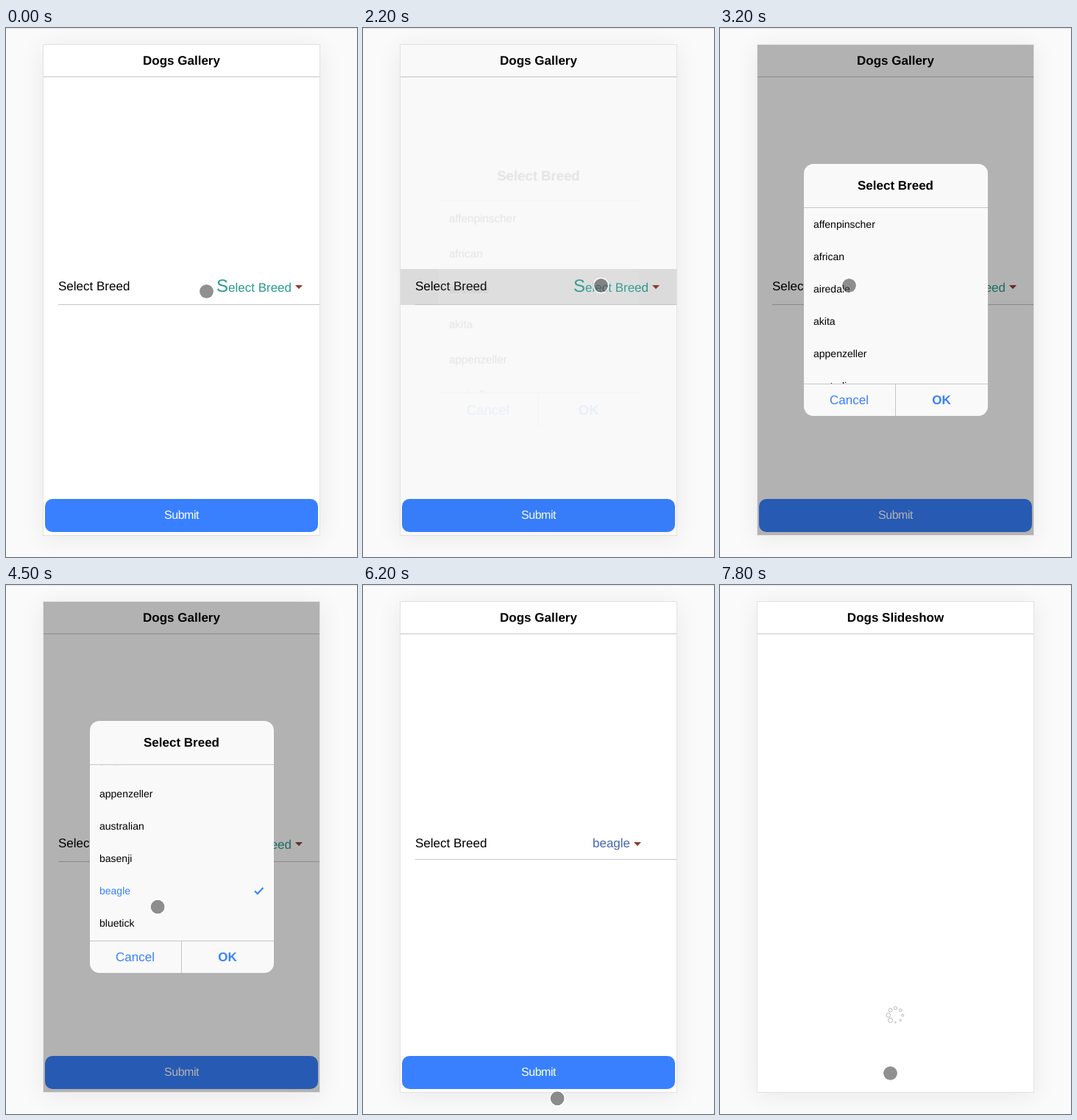
Write an HTML page with a canvas that moves like this. It is 477 px wide and 720 px high and loops after 8 s.

```html
<!DOCTYPE html>
<html lang="en">
<head>
<meta charset="utf-8">
<title>Dogs Gallery</title>
<style>
html, body { margin: 0; width: 477px; height: 720px; overflow: hidden; background: #fafafa; }
canvas { display: block; }
</style>
</head>
<body>
<canvas id="stage" width="477" height="720"></canvas>
<script>
const W = 477, H = 720, LOOP = 8000, STEP = 100;
const BLUE = '#3880ff', TEAL = '#2a9a8c', LINE = '#c6c6c8';
const BREEDS = ['affenpinscher', 'african', 'airedale', 'akita', 'appenzeller',
  'australian', 'basenji', 'beagle', 'bluetick'];

const stage = document.getElementById('stage').getContext('2d');
const layer = document.createElement('canvas');
layer.width = W;
layer.height = H;
const sheet = layer.getContext('2d');

// The pointer rests between glides; each one bends towards its "via" point.
const HOME = [272, 358];
const GLIDES = [
  { start: 400, length: 500, via: [238, 260], to: [267, 204] },
  { start: 1200, length: 400, via: [346, 392], to: [323, 350] },
  { start: 2600, length: 600, via: [249, 358], to: [175, 350] },
  { start: 3200, length: 300, via: [180, 300], to: [182, 258] },
  { start: 3500, length: 700, via: [186, 336], to: [181, 414] },
  { start: 4400, length: 420, via: [273, 502], to: [283, 513] },
  { start: 5813, length: 787, via: [269, 812], to: [231, 664] }
];

function progress(t, start, length) {
  return Math.min(1, Math.max(0, (t - start) / length));
}

function ease(t, start, length) {
  const p = progress(t, start, length);
  return p * p * (3 - 2 * p);
}

function pointerAt(t) {
  return GLIDES.reduce((from, { start, length, via, to }) => {
    const p = ease(t, start, length), q = 1 - p;
    return from.map((v, n) => q * q * v + 2 * p * q * via[n] + p * p * to[n]);
  }, HOME);
}

function scrollAt(t) {
  return 159 * (1 - (1 - progress(t, 3200, 1000)) ** 8);
}

function rect(c, x, y, w, h, color) {
  c.fillStyle = color;
  c.fillRect(x, y, w, h);
}

function rounded(c, x, y, w, h, r, color) {
  c.beginPath();
  c.roundRect(x, y, w, h, r);
  c.fillStyle = color;
  c.fill();
}

function text(c, str, x, y, { size = 17, weight = 'normal', color = '#000', align = 'left', spacing = '0px' } = {}) {
  c.font = `${weight} ${size}px "Liberation Sans", Arial, sans-serif`;
  c.textRendering = 'geometricPrecision';
  c.letterSpacing = spacing;
  c.textAlign = align;
  c.fillStyle = color;
  c.fillText(str, x, y);
}

function drawFrame(title) {
  const c = stage;
  rect(c, 0, 0, W, H, '#fafafa');
  rect(c, 0, 0, W, 1, '#e4e4e4');
  c.save();
  c.shadowColor = 'rgba(0,0,0,0.07)';
  c.shadowBlur = 32;
  c.shadowOffsetY = 4;
  rect(c, 50, 22, 377, 669, '#e2e2e2');
  c.restore();
  rect(c, 51, 23, 375, 667, '#fff');
  text(c, title, 238.5, 50, { weight: 'bold', align: 'center' });
  rect(c, 51, 66, 375, 1, LINE);
}

function drawArrow(x) {
  const c = stage;
  c.beginPath();
  c.moveTo(x, 350);
  c.lineTo(x + 10, 350);
  c.lineTo(x + 5, 355.3);
  c.fillStyle = '#8e3d30';
  c.fill();
}

function drawGallery(t) {
  const c = stage, chosen = t >= 5300;
  drawFrame('Dogs Gallery');
  if (t >= 2000 && t < 2500) rect(c, 51, 328, 375, 49, '#e0e0e0');
  rect(c, 71, chosen ? 373 : 376, 355, 1, LINE);
  text(c, 'Select Breed', 71, 357);
  if (chosen) {
    text(c, 'beagle', 312, 357, { color: '#4766ab' });
    drawArrow(368);
  } else {
    text(c, 'S', 286, 359, { size: 24, color: TEAL });
    text(c, 'elect Breed', 302, 359, { color: TEAL });
    drawArrow(393);
  }
  c.globalAlpha = 1 - 0.5 * progress(t, 6900, 200);
  rounded(c, 53, 641, 371, 45, 10, BLUE);
  c.globalAlpha = 1;
  text(c, 'Submit', 238.5, 668, { size: 16, color: '#fff', align: 'center', spacing: '-0.48px' });
}

function drawCheck(c, y) {
  c.beginPath();
  c.moveTo(338, y - 4.5);
  c.lineTo(341.8, y - 0.7);
  c.lineTo(349.5, y - 9);
  c.lineWidth = 2;
  c.strokeStyle = BLUE;
  c.stroke();
}

function drawList(c, t) {
  c.save();
  c.beginPath();
  c.rect(114, 245, 250, 239);
  c.clip();
  BREEDS.forEach((name, i) => {
    const y = 272 + i * 44 - Math.round(scrollAt(t));
    const checked = name === 'beagle' && t >= 4500;
    text(c, name, 127, y, { size: 14, color: checked ? BLUE : '#000' });
    if (checked) drawCheck(c, y);
  });
  c.restore();
}

function drawDialog(t) {
  const c = sheet;
  c.clearRect(0, 0, W, H);
  rounded(c, 114, 185, 250, 343, 13, '#f9f9f9');
  if (t >= 5100 && t < 5300) rounded(c, 239, 485, 125, 43, [0, 0, 13, 0], '#e9e9e9');
  text(c, 'Select Breed', 238.5, 220, { weight: 'bold', align: 'center' });
  drawList(c, t);
  rect(c, 114, 244, 250, 1, LINE);
  rect(c, 114, 484, 250, 1, LINE);
  rect(c, 238, 485, 1, 43, LINE);
  text(c, 'Cancel', 175.5, 512, { color: BLUE, align: 'center' });
  text(c, 'OK', 301, 512, { color: BLUE, weight: 'bold', align: 'center' });
}

function drawAlert(t) {
  if (t < 2200 || t >= 5500) return;
  const enter = ease(t, 2165, 200), leave = ease(t, 5264, 200);
  const shown = enter * (1 - leave);
  const scale = 1.1 - 0.1 * enter - 0.1 * leave;
  const c = stage;
  rect(c, 51, 23, 375, 667, `rgba(0,0,0,${0.3 * shown})`);
  drawDialog(t);
  c.save();
  c.globalAlpha = shown;
  c.translate(239, 356.5);
  c.scale(scale, scale);
  c.drawImage(layer, -239, -356.5);
  c.restore();
}

function drawSpinner(t) {
  const c = stage, head = 3 + (t - 7800) / STEP;
  c.lineWidth = 0.8;
  c.strokeStyle = '#a4a4a4';
  for (let i = 0; i < 8; i++) {
    const angle = i * Math.PI / 4;
    const age = (i - head + 16) % 8;
    c.beginPath();
    c.arc(238.5 + 9.7 * Math.cos(angle), 585.6 + 9.7 * Math.sin(angle), 3.1 - 0.32 * age, 0, 2 * Math.PI);
    c.stroke();
  }
}

function drawPointer(t) {
  const c = stage, [x, y] = pointerAt(t);
  c.beginPath();
  c.arc(x + 0.5, y + 0.5, 9.5, 0, 2 * Math.PI);
  c.fillStyle = 'rgba(70,70,70,0.6)';
  c.fill();
  c.beginPath();
  c.arc(x + 0.5, y + 0.5, 10.3, 0, 2 * Math.PI);
  c.lineWidth = 1.5;
  c.strokeStyle = 'rgba(255,255,255,0.85)';
  c.stroke();
}

function draw(now) {
  const t = Math.floor((now % LOOP) / STEP) * STEP;
  if (t < 7200) {
    drawGallery(t);
    drawAlert(t);
  } else {
    drawFrame('Dogs Slideshow');
    drawSpinner(t);
  }
  drawPointer(t);
}

let start;
function tick(now) {
  start ??= now;
  draw(Math.max(0, now - start));
  requestAnimationFrame(tick);
}
draw(0);
requestAnimationFrame(tick);
</script>
</body>
</html>
```
